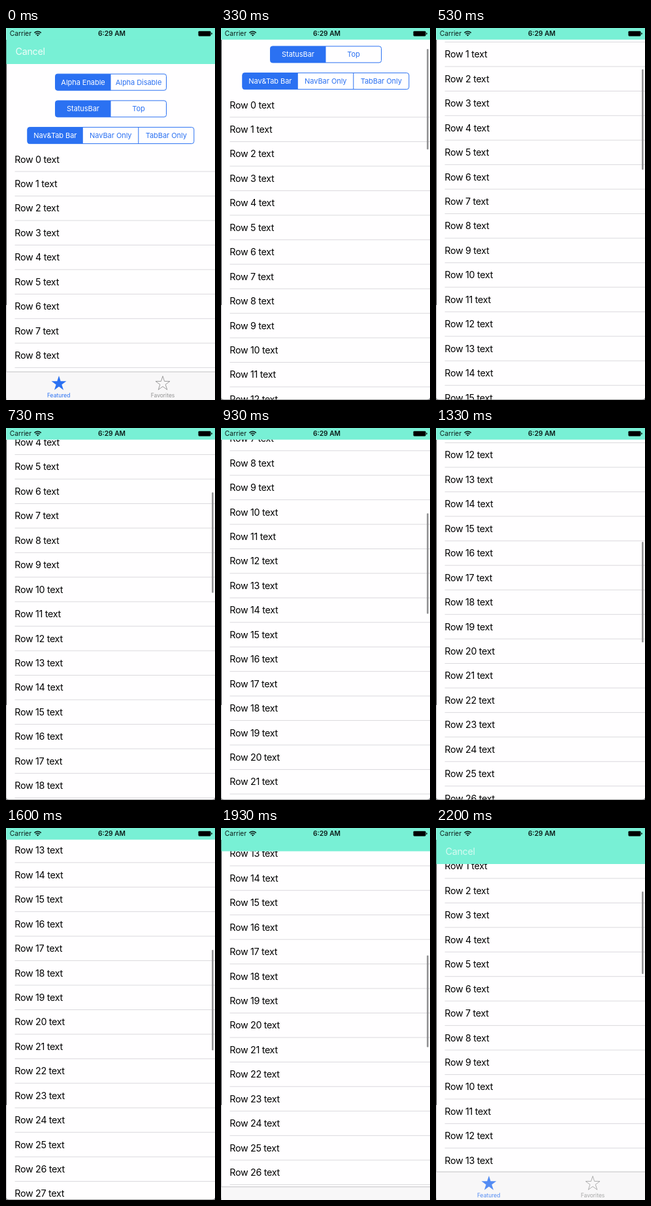
These frames come from a looping animation (320x568 px, 2.27 s). An HTML page:

```html
<!DOCTYPE html>
<html lang="en">
<head>
<meta charset="utf-8">
<title>Scrolling list with collapsing bars</title>
<style>
  html, body { margin: 0; width: 100%; height: 100%; overflow: hidden; background: #fff; }
  svg { display: block; width: 320px; height: 568px; }
  text { font-family: Inter, Roboto, sans-serif; }
  .row { font-size: 14.3px; letter-spacing: -.3px; fill: #000; }
  .seg { font-size: 11px; letter-spacing: -.05px; text-anchor: middle; }
  .tab { font-size: 8.5px; text-anchor: middle; }
  .status { font-size: 10.2px; fill: #0b1a17; }
</style>
</head>
<body>
<svg id="stage" viewBox="0 0 320 568">
  <rect width="320" height="568" fill="#fffeff"/>
  <g id="list"></g>
  <path d="M.5 18V423" stroke="#3c3c3f"/>
  <path d="M.5 423V568" stroke="#c4c4c6"/>
  <path d="M0 564Q1 567.3 5 567.3H315Q319.5 567.3 320 564V568H0Z" fill="#858587"/>
  <rect id="thumb" x="315.2" width="2.4" rx="1.2" fill="#8a8a8c"/>

  <g id="tabBar">
    <rect x=".5" y="525" width="320" height="44" fill="#f8f7f8"/>
    <path d="M.5 525H320" stroke="#b9b9bb" stroke-width=".9"/>
    <g id="tabItems"></g>
  </g>

  <g id="navBar">
    <rect x=".5" y="0" width="320" height="55" fill="#78f0d5"/>
    <text id="cancel" class="row" x="14.6" y="41" style="fill:#effdf9">Cancel</text>
  </g>

  <rect x=".5" width="320" height="17.5" fill="#78f0d5"/>
  <text class="status" x="5.8" y="12.3">Carrier</text>
  <g fill="none" stroke="#0b1a17" stroke-width="1.4">
    <path d="M43.4 7.4Q48.6 2.9 53.8 7.4"/>
    <path d="M45.3 9.4Q48.6 6.6 51.9 9.4"/>
  </g>
  <path d="M46.7 10.7Q48.6 9.1 50.5 10.7L48.6 12.6Z" fill="#0b1a17"/>
  <text class="status" x="162" y="12.3" text-anchor="middle" font-weight="600">6:29 AM</text>
  <rect x="294.5" y="4.8" width="19" height="7.6" rx="1.4" fill="#000"/>
  <path d="M314.3 7Q315.8 7.2 315.8 8.6T314.3 10.2Z" fill="#000"/>
</svg>
<script>
const LOOP = 2270, STEP = 1000 / 15;
const PITCH = 37.44, BLUE = '#2b71f2', GRAY = '#929292';
const BAR = 37.5, TAB = 43, PEAK = 666, TURN = 1860;

// time, scroll offset, velocity
const KEYS = [
  [0, 0, .1], [330, 83, .48], [730, 328.3, .64], [1130, 542.6, .42],
  [1600, 653, .1], [TURN, PEAK, 0], [1930, 648, -.75], [2200, 179.6, -1.9], [LOOP, 60, -1.5]
];

const $ = id => document.getElementById(id);
const clamp = v => Math.max(0, Math.min(1, v));
const mix = (a, b, u) => a + (b - a) * u;

function add(parent, tag, attrs, text) {
  const el = document.createElementNS('http://www.w3.org/2000/svg', tag);
  for (const name in attrs) el.setAttribute(name, attrs[name]);
  if (text) el.textContent = text;
  parent.appendChild(el);
}

function segmented(x, y, labels) {
  const w = 85, h = 25, right = x + w * labels.length, list = $('list');
  add(list, 'path', {
    d: `M${x + w} ${y}H${x + 3.4}Q${x} ${y} ${x} ${y + 3.4}V${y + h - 3.4}Q${x} ${y + h} ${x + 3.4} ${y + h}H${x + w}Z`,
    fill: BLUE
  });
  add(list, 'rect', { x, y, width: right - x, height: h, rx: 3.4, fill: 'none', stroke: BLUE });
  labels.forEach((label, i) => {
    if (i > 1) add(list, 'path', { d: `M${x + w * i} ${y}v${h}`, stroke: BLUE });
    add(list, 'text', { class: 'seg', x: x + w * (i + .5), y: y + 16.5, fill: i ? BLUE : '#fff' }, label);
  });
}

function star(cx, cy, r) {
  const points = [];
  for (let i = 0; i < 10; i++) {
    const a = Math.PI * i / 5, d = i % 2 ? r * .382 : r;
    points.push((cx + d * Math.sin(a)).toFixed(2) + ',' + (cy - d * Math.cos(a)).toFixed(2));
  }
  return points.join(' ');
}

function build() {
  segmented(75.5, 70.2, ['Alpha Enable', 'Alpha Disable']);
  segmented(75.5, 110.9, ['StatusBar', 'Top']);
  segmented(32.8, 151.6, ['Nav&Tab Bar', 'NavBar Only', 'TabBar Only']);
  for (let i = 0; i < 30; i++) {
    const y = i * PITCH;
    add($('list'), 'text', { class: 'row', x: 13.2, y: 205.6 + y }, `Row ${i} text`);
    add($('list'), 'path', { d: `M13.5 ${219.1 + y}H320`, stroke: '#d6d5da', 'stroke-width': .9 });
  }
  const items = $('tabItems');
  add(items, 'polygon', { points: star(81, 543, 12), fill: BLUE });
  add(items, 'polygon', { points: star(240, 543, 11.5), fill: 'none', stroke: GRAY, 'stroke-width': .9 });
  add(items, 'text', { class: 'tab', x: 80.7, y: 564.4, fill: BLUE }, 'Featured');
  add(items, 'text', { class: 'tab', x: 240, y: 564.4, fill: GRAY }, 'Favorites');
}

function scrollAt(t) {
  let i = 0;
  while (i < KEYS.length - 2 && t >= KEYS[i + 1][0]) i++;
  const [t0, s0, v0] = KEYS[i], [t1, s1, v1] = KEYS[i + 1];
  const d = t1 - t0, u = (t - t0) / d, w = 1 - u;
  return w * w * ((1 + 2 * u) * s0 + u * d * v0) + u * u * ((3 - 2 * u) * s1 - w * d * v1);
}

function draw(time) {
  const frame = Math.floor((time % LOOP + 3.4) / STEP);
  const t = Math.min(Math.round(frame * STEP / 10) * 10, LOOP - 70);
  const s = scrollAt(t);
  const back = t > TURN;
  const shown = clamp(back ? (PEAK - s) / BAR : 1 - s / BAR);
  const alpha = back ? clamp((t - 1930) / 340) : clamp(2 * shown - 1);

  $('list').setAttribute('transform', `translate(0 ${-s})`);
  $('navBar').setAttribute('transform', `translate(0 ${-BAR * (1 - shown)})`);
  $('tabBar').setAttribute('transform', `translate(0 ${(TAB + 1) * (1 - shown)})`);
  $('cancel').setAttribute('opacity', alpha);
  $('tabItems').setAttribute('opacity', alpha);

  const thumb = $('thumb');
  thumb.setAttribute('y', mix(9.6, 55.4, shown) + mix(.27, .231, shown) * s);
  thumb.setAttribute('height', mix(153.5, 126, shown));
  thumb.setAttribute('opacity', clamp(t / 70));
}

function tick() {
  draw(performance.now());
  requestAnimationFrame(tick);
}

build();
tick();
</script>
</body>
</html>
```
